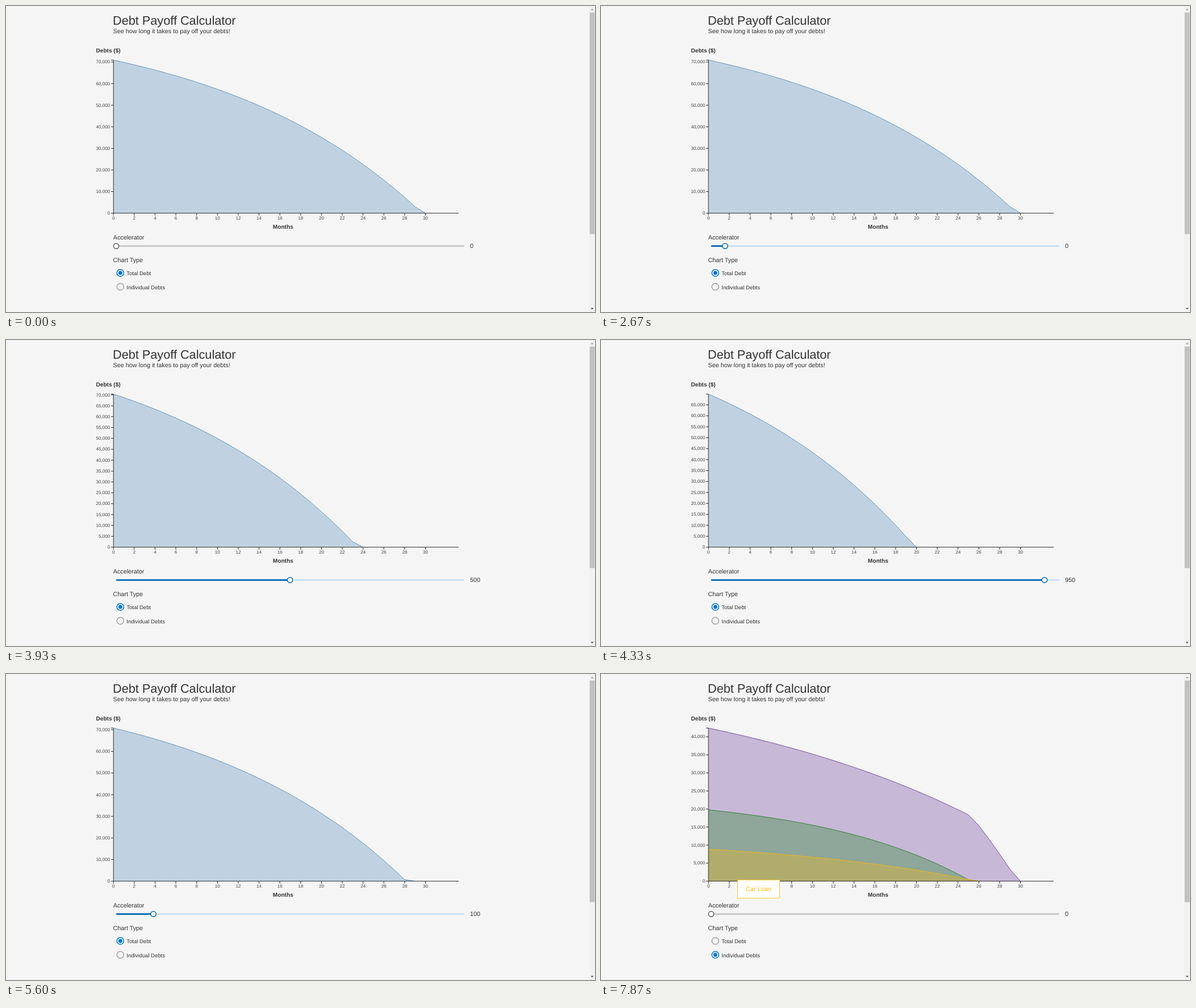
An HTML page with a canvas for the animation above (8000 ms loop, 1037 px wide and 540 px high).

```html
<!DOCTYPE html>
<html lang="en">
<head>
<meta charset="utf-8">
<title>Debt Payoff Calculator</title>
<style>
html, body { margin: 0; width: 100%; height: 100%; overflow: hidden; background: #f5f5f5; }
canvas { display: block; width: 1037px; height: 540px; }
</style>
</head>
<body>
<canvas id="stage" width="1037" height="540"></canvas>
<script>
const ctx = document.getElementById('stage').getContext('2d');
const LOOP = 8000;
const FONT = '"Liberation Sans", Arial, sans-serif';
const LEFT = 189.2, BOTTOM = 365.6, TOP = 95.4, RIGHT = 797, MONTH = 18.31;
const BLUE = '#0078d4', DEEP = '#0068b4', PALE = '#c7e0f4', GREY = '#c8c6c4';

// [time, slider position 0..1]
const drag = [
  [0, 0], [2670, .04], [2730, .1], [2800, .17], [2870, .21],
  [3200, .26], [3270, .314], [3400, .36], [3470, .4],
  [3870, .43], [3930, .5], [4000, .6], [4130, .72], [4200, .84], [4330, .959], [4400, .985], [4470, 1],
  [4800, .97], [4930, .9], [5070, .8], [5130, .7],
  [5400, .55], [5470, .38], [5530, .22], [5600, .107], [5670, .08], [5730, .06], [5870, .04],
  [5930, .025], [6070, .01], [6130, 0]
];

const within = (t, a, b) => t >= a && t < b;
const ramp = (t, a, len) => Math.max(0, Math.min(1, (t - a) / len));
const at = (keys, t) => keys.filter(k => k[0] <= t).pop()[1];

function text(s, x, y, size, color = '#333', align = 'left', weight = 'normal') {
  ctx.font = `${weight} ${size}px ${FONT}`;
  ctx.textAlign = align;
  ctx.fillStyle = color;
  ctx.fillText(s, x, y);
}

function line(x1, y1, x2, y2, color, width) {
  ctx.strokeStyle = color;
  ctx.lineWidth = width;
  ctx.beginPath();
  ctx.moveTo(x1, y1);
  ctx.lineTo(x2, y2);
  ctx.stroke();
}

function box(x, y, w, h, color) {
  ctx.fillStyle = color;
  ctx.fillRect(x, y, w, h);
}

function disc(x, y, r, fill, stroke, width) {
  ctx.beginPath();
  ctx.arc(x, y, r, 0, Math.PI * 2);
  if (fill) { ctx.fillStyle = fill; ctx.fill(); }
  if (stroke) { ctx.strokeStyle = stroke; ctx.lineWidth = width; ctx.stroke(); }
}

// Balance left after each month with compound growth and steady payments.
function balances(start, growth, cost) {
  const out = [];
  let left = start;
  for (let m = 0; left > 0; m++) {
    out.push(left);
    left = start * (1 - cost * (growth ** (m + 1) - 1));
  }
  return out.concat(0);
}

function area(values, max, color) {
  const px = i => LEFT + i * MONTH;
  const py = v => BOTTOM - v / max * (BOTTOM - TOP);
  const top = new Path2D();
  values.forEach((v, i) => top.lineTo(px(i), py(v)));
  const shape = new Path2D(top);
  shape.lineTo(LEFT, BOTTOM);
  ctx.globalAlpha = .3;
  ctx.fillStyle = color;
  ctx.fill(shape);
  ctx.globalAlpha = 1;
  ctx.strokeStyle = color;
  ctx.lineWidth = .8;
  ctx.stroke(top);
}

function axes(max) {
  const ink = '#222', w = .95;
  line(LEFT, TOP, LEFT, BOTTOM, ink, w);
  line(LEFT, BOTTOM, RIGHT, BOTTOM, ink, w);
  line(LEFT - 4.3, TOP, LEFT, TOP, ink, w);
  const step = max >= 70711 ? 10000 : 5000;
  for (let v = 0; v <= max; v += step) {
    const y = BOTTOM - v / max * (BOTTOM - TOP);
    line(LEFT - 4.3, y, LEFT, y, ink, w);
    text(v.toLocaleString('en-US'), 183.2, y + 2.6, 8.05, '#444', 'right');
  }
  for (let m = 0; m <= 30; m += 2) {
    const x = LEFT + m * MONTH;
    line(x, BOTTOM, x, BOTTOM + 4.2, ink, w);
    text(m, x, 377.2, 8.05, '#444', 'center');
  }
}

function chart(accel, split) {
  let max = 70900 - accel;
  if (split) {
    max = 42430;
    const rest = balances(max, 1.0355, .407).slice(0, 26);
    area(rest.concat([.363, .272, .177, .077, 0].map(f => f * max)), max, '#5c2d91');
    area(balances(19760, 1.0698, .2225), max, '#107c10');
    area(balances(8860, 1.0507, .3875), max, '#ffb900');
  } else {
    area(balances(max, 1.0512, (20866 + 21.33 * accel) / max), max, '#4682b4');
  }
  axes(max);
}

function slider(pos, accel, t) {
  const x0 = 194, x1 = 806, y = 423.6, x = x0 + pos * (x1 - x0);
  const hover = within(t, 1730, 6330), held = within(t, 2270, 6270);
  const tint = held ? DEEP : BLUE;
  ctx.lineCap = 'round';
  line(x0 + 1, y, x1 - .5, y, hover ? PALE : GREY, 2.7);
  if (pos > 0) line(x0 + 1, y, x, y, tint, 2.7);
  ctx.lineCap = 'butt';
  disc(x, y, 4.7, '#fff', hover ? tint : '#605e5c', 1.5);
  text(accel, 817, 427.4, 10.85);
}

function radio(label, y, dot, on, hover, glow) {
  const x = 201.3;
  const shade = Math.round(160 - 50 * glow);
  const ring = on ? (hover ? '#106ebe' : BLUE) : `rgb(${shade},${shade},${shade})`;
  disc(x, y, 6.1, null, ring, 1.5);
  if (dot > 0) disc(x, y, 3.5 * dot, on && hover ? '#106ebe' : BLUE);
  text(label, 212.3, y + 4, 9.5, hover ? '#111' : '#333');
}

function tooltip(label, x, y, color) {
  box(x, y, 75, 33, '#fff');
  ctx.strokeStyle = color;
  ctx.lineWidth = .8;
  ctx.strokeRect(x + .5, y + .5, 74, 32);
  text(label, x + 37.5, y + 20.4, 10.9, color, 'center');
}

function triangle(y, dir, color) {
  ctx.fillStyle = color;
  ctx.beginPath();
  ctx.moveTo(1029.4, y);
  ctx.lineTo(1034.6, y);
  ctx.lineTo(1032, y + 2.8 * dir);
  ctx.fill();
}

function scrollbar() {
  box(1027, 0, 10, 540, '#f1f1f1');
  box(1027.6, 11.5, 8.8, 391, '#c1c1c1');
  triangle(7.4, -1, '#a3a3a3');
  triangle(532.8, 1, '#505050');
}

function draw(t) {
  const pos = at(drag, t);
  const accel = Math.floor(pos * 20 + .001) * 50;
  const split = t >= 7000;
  const hover = within(t, 6470, 7730);
  const grow = ramp(t, 6960, 170);

  box(0, 0, 1037, 540, '#f5f5f5');
  text('Debt Payoff Calculator', 188, 33, 21.7);
  text('See how long it takes to pay off your debts!', 188.5, 47.6, 10.8);
  text('Debts ($)', 158.5, 81.5, 10.1, '#333', 'left', 'bold');
  chart(accel, split);
  text('Months', 487.8, 393, 10.1, '#333', 'center', 'bold');
  text('Accelerator', 188.7, 411.8, 10.8);
  slider(pos, accel, t);
  text('Chart Type', 188.5, 451.8, 10.8);
  radio('Total Debt', 471, split ? 1 - grow : 1, !split, false, 0);
  radio('Individual Debts', 495.5, split ? grow : 0, split, hover, hover ? ramp(t, 6470, 200) : 0);
  if (within(t, 600, 1670)) tooltip('Total Debt', 503, 209, '#4682b4');
  if (t >= 7870) tooltip('Car Loan', 240, 363, '#ffb900');
  scrollbar();
}

ctx.textRendering = 'geometricPrecision';
const begin = performance.now();
function tick() {
  draw((performance.now() - begin) % LOOP);
  requestAnimationFrame(tick);
}
tick();
</script>
</body>
</html>
```
